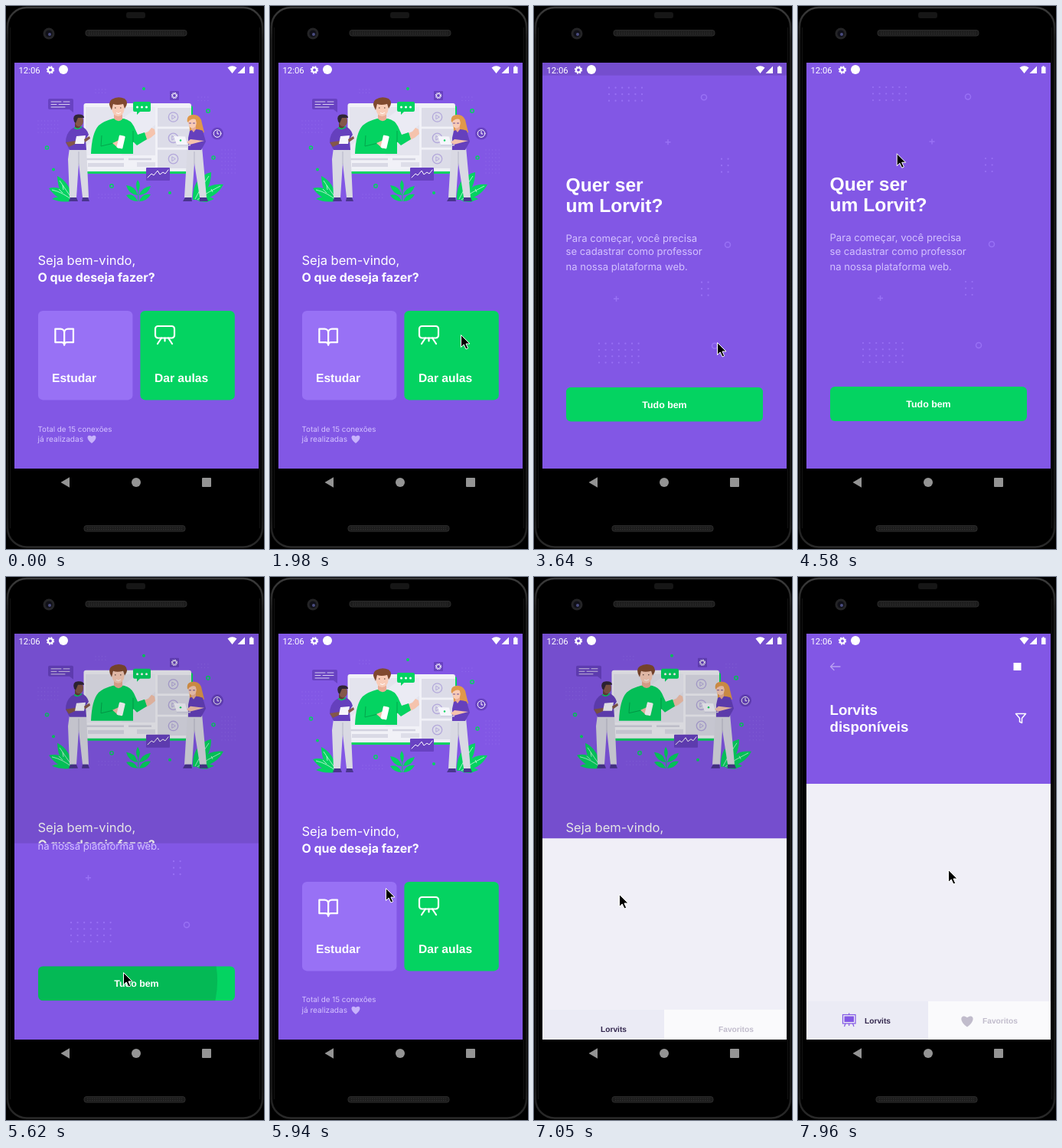
Recreate the animation shown at these times as an HTML page. Size 337 by 709 pixels, loop 7990 ms.

```html
<!DOCTYPE html>
<html lang="pt-BR">
<head>
<meta charset="utf-8">
<title>Aulas</title>
<style>
html, body { margin: 0; width: 100%; height: 100%; overflow: hidden; background: #000; }
svg { display: block; width: 337px; height: 709px; }
text { fill: #fff; text-rendering: geometricPrecision; }
.soft { font-family: Inter, "Open Sans", sans-serif; }
.bold { font-family: "Liberation Sans", Arial, sans-serif; font-weight: 700; }
.pale { fill: #d4c2ff; }
.line { fill: none; stroke: #fff; stroke-width: 2.2; stroke-linecap: round; stroke-linejoin: round; }
.dots { fill: none; stroke: #9871f5; stroke-width: 2.2; stroke-linecap: round; stroke-dasharray: 0 8.6; }
.tiny { fill: none; stroke: #9470ec; stroke-width: 1; stroke-linecap: round; stroke-dasharray: 0 4.3; }
.ring { fill: none; stroke: #9871f5; stroke-width: 1.5; }
.leaf { fill: #04d361; }
.vein { fill: none; stroke: #d5f7e3; stroke-width: .8; }
.deep { fill: #6842c2; }
.thin { fill: none; stroke: #fff; stroke-width: 1; stroke-linecap: round; stroke-linejoin: round; }
</style>
</head>
<body>
<svg viewBox="0 0 337 709">
<defs>
  <clipPath id="screen"><rect x="11" y="74" width="319" height="530"/></clipPath>
  <clipPath id="infoClip"><rect x="11" y="74" width="319" height="530"/></clipPath>
  <clipPath id="listClip"><rect x="11" y="74" width="319" height="530"/></clipPath>
  <clipPath id="studyClip"><rect x="42" y="398" width="123.400" height="116.400" rx="6.200"/></clipPath>
  <clipPath id="teachClip"><rect x="175.400" y="398" width="123.400" height="116.400" rx="6.200"/></clipPath>
  <clipPath id="okClip"><rect x="42" y="497" width="257" height="45" rx="6.200"/></clipPath>
  <linearGradient id="edge" x2="0" y2="1">
    <stop stop-color="#3c3c3c"/><stop offset=".06" stop-color="#1c1c1c"/>
    <stop offset=".94" stop-color="#181818"/><stop offset="1" stop-color="#2a2a2a"/>
  </linearGradient>
  <g id="grille">
    <rect width="132" height="7.500" rx="3" fill="#1c1c1c" stroke="#2c2c2c"/>
    <path d="M4 2.500H128M4 5H128" stroke="#333" stroke-dasharray="1.500 1.500"/>
  </g>
  <g id="play">
    <rect x="198" y="133" width="44" height="24.500" fill="#dcdce8"/>
    <circle cx="218.500" cy="145" r="6.200" fill="none" stroke="#b3a8db" stroke-width="1.300"/>
    <path d="M216.800 142.200l4.500 2.800-4.500 2.800z" fill="none" stroke="#b3a8db"/>
  </g>
  <path id="heart" d="M0 5.500C-9-1-5.500-7.500 0-3.500 5.500-7.500 9-1 0 5.500z"/>
</defs>

<g id="device">
  <rect x="2" y="2" width="333" height="704.500" rx="25" fill="#000" stroke="url(#edge)" stroke-width="2.500"/>
  <path d="M5.500 28V682M331.500 28V682" stroke="#141414"/>
  <rect x="157" y="8" width="25" height="8" rx="3" fill="#161616"/>
  <circle cx="56" cy="36" r="7.500" fill="#242426"/>
  <circle cx="56" cy="36" r="4.500" fill="#101018"/>
  <circle cx="57" cy="37" r="2" fill="#4b4d80"/>
  <use href="#grille" x="104" y="31.500"/>
  <use href="#grille" x="102" y="678.500"/>
  <g fill="#949494"><path d="M71.500 622l11.500-6.800v13.600z"/><circle cx="170" cy="622" r="6"/><rect x="256" y="616" width="12" height="12" rx="1"/></g>
</g>

<g clip-path="url(#screen)">
  <rect x="11" y="74" width="319" height="530" fill="#8257e5"/>
  <g id="home">
    <path class="tiny" d="M117 109h14m-14 4.300h14M42 150h28m-28 5h28m-28 5h28m-28 5h28M282 188h18m-18 5h18m-18 5h18m-18 5h18m-18 5h18m-18 5h18m-18 5h18M121 246h26m-26 4.500h26M251 119h14m-14 4.500h14"/>
    <g fill="none" stroke="#04d361" stroke-width="1.400">
      <circle cx="264" cy="137" r="2.300"/><circle cx="53.500" cy="185" r="2"/><circle cx="271" cy="198" r="2"/><circle cx="138" cy="235" r="2.200"/>
    </g>
    <g class="leaf"><circle cx="180" cy="108" r="2"/><circle cx="62" cy="213.500" r="2"/><circle cx="214" cy="244" r="2"/></g>

    <!-- plants -->
    <g class="leaf">
      <path d="M87 255Q68 250 67 222Q84 230 88 255z"/><path d="M86 255Q68 255 56 238Q75 233 88 255z"/><path d="M85 255Q72 257 60 252Q70 246 86 255z"/>
      <path d="M244 253Q243 224 268 217Q268 241 249 253z"/><path d="M249 254Q261 230 284 233Q274 252 249 254z"/><path d="M251 255Q262 246 272 252L262 256z"/>
      <path d="M172 241Q168 234 172 227Q177 234 173 241z"/>
      <path d="M172 247Q160 246 157 234Q169 235 172 247zM174 247Q177 237 189 235Q186 246 174 247zM172 255Q162 255 157 247Q167 244 172 255zM174 255Q178 244 189 246Q184 255 174 255z"/>
    </g>
    <path d="M172.800 238V255" stroke="#04d361"/>
    <path class="vein" d="M70 228Q78 240 88 254M60 240Q74 243 87 254M74 234l1 6M69 239l5 5M265 222Q254 237 247 252M280 235Q263 243 250 253M255 233l5 1M268 239l2 4"/>

    <!-- class screen -->
    <rect x="104" y="130" width="140" height="89" rx="3" class="leaf"/>
    <rect x="101.500" y="127" width="140.500" height="89" rx="3" fill="#f1f1f7"/>
    <rect x="104" y="132" width="91" height="63" fill="#e4e4ee"/>
    <path d="M172 132H195V155L150 195H104V183z" fill="#ebebf4"/>
    <use href="#play"/><use href="#play" y="27.300"/><use href="#play" y="54.600"/>
    <path d="M105 200H154M160 200H190" stroke="#d2d2df" stroke-width="2.500"/>
    <rect x="107" y="205" width="47" height="5" fill="#d9d9e5"/><rect x="171" y="204" width="24" height="6" fill="#dedee9"/>

    <!-- teacher -->
    <path d="M178 167L186 164 190 159 194 161 195 167 189 172 181 176z" fill="#f5c3ad"/>
    <path d="M111 193Q112 166 121 156Q128 150 140 147H154Q163 149 167 157L172 168 181 165 184 174 171 182 166 177V193z" fill="#04d361"/>
    <path d="M125 169L124 183 141 179M166 163V178" fill="none" stroke="#03a54c"/>
    <path d="M141 140H152V148Q146 153 141 147z" fill="#eaac95"/>
    <ellipse cx="146.500" cy="134.500" rx="8" ry="9.500" fill="#f8cbb7"/>
    <path d="M138 136Q132 126 138 122Q146 117 155 121Q161 126 155 134L153 128Q145 130 140 128z" fill="#80492f"/>
    <path d="M144 139.500Q147 142 150 139" fill="none" stroke="#fff"/>
    <path d="M142 133h1.500M149 133h1.500" stroke="#44302c"/>
    <path d="M139 179L148 175 153 180 147 186z" fill="#f5c3ad"/>
    <rect x="146" y="169" width="8" height="17" rx="1.500" fill="#fff" transform="rotate(13 150 178)"/>

    <!-- bubbles and tiles -->
    <path d="M168 125H187Q189 125 189 127V136Q189 138 187 138H175L171 142V138H168Q166 138 166 136V127Q166 125 168 125z" class="leaf"/>
    <g fill="#fff"><circle cx="171.500" cy="132" r="1.500"/><circle cx="177.500" cy="132" r="1.500"/><circle cx="183.500" cy="132" r="1.500"/></g>
    <path class="deep" d="M57 121H86Q88 121 88 123V139L83 135H57Q55 135 55 133V123Q55 121 57 121z"/>
    <path class="thin" d="M59 125H72M75 125H83M59 128.500H66M69 128.500H83M59 132H77" opacity=".75"/>
    <rect class="deep" x="214" y="111" width="12" height="12" rx="1"/>
    <circle cx="220" cy="117" r="2.500" class="thin"/><circle cx="220" cy="117" r="3.700" class="thin" stroke-dasharray="1.200 1.700"/>
    <circle class="deep" cx="276" cy="166.500" r="8"/>
    <circle class="thin" cx="276" cy="166.500" r="4.800"/><path class="thin" d="M276 163.500V167H278"/>
    <rect class="deep" x="183" y="211" width="31" height="17" rx="1"/>
    <path class="thin" d="M185 224L190 219 193 221 198 215 201 220 205 217 208 219 212 214"/>

    <!-- student with tablet -->
    <path d="M83 185H105L108 250H100L95 205 92 250H83L81 200z" fill="#d9d9e3"/><path d="M95 190V207" stroke="#b5b5c7"/>
    <path d="M84 250h8l2 5H82zM100 250h7l2 5H99z" fill="#49358e"/>
    <path d="M85 161Q90 157 98 157Q106 160 108 168L104 174 105 188H83L78 178Q78 167 85 161z" fill="#6540bd"/>
    <path d="M90 152H97V158L94 161 90 158z" fill="#643f36"/>
    <ellipse cx="95.500" cy="150" rx="5.500" ry="7.500" fill="#84574a"/>
    <path d="M89 151Q86 142 94 141.500Q102 141 102 146L94 146 91 153z" fill="#302536"/>
    <path d="M89 158.500Q94 163 99 157.500" fill="none" stroke="#04d361" stroke-width="1.400"/>
    <path d="M78 178L91 176 93 179 82 184z" fill="#84574a"/>
    <path d="M92 170l12-1-2 11-12 0z" fill="#f5f5fb"/><path d="M102 174l7-4 1 3-7 5z" fill="#84574a"/>

    <!-- student with laptop -->
    <path d="M237 184H256L262 250H253L246 205 243 250H233z" fill="#d9d9e3"/><path d="M246 190V207" stroke="#b5b5c7"/>
    <path d="M234 250h8l1 5H231zM253 250h9l2 5H253z" fill="#49358e"/>
    <path d="M237 149Q238 142 246 142Q255 143 256 153L259 165 249 167 240 164Q240 154 237 149z" fill="#e0984b"/>
    <path d="M240 163Q249 159 257 163L261 177 255 188H238V172z" fill="#6540bd"/>
    <path d="M242 155H248V161L245 165 242 161z" fill="#eaac95"/>
    <ellipse cx="243.500" cy="152.500" rx="5.200" ry="7" fill="#f8cbb7"/>
    <path d="M237 152Q235 142 245 142Q254 143 254 155L251 161 248 148Q242 146 237 152z" fill="#e0984b"/>
    <path d="M239 153h3M244 153h3" stroke="#70508f"/>
    <path d="M259 176L240 181 236 178 241 174z" fill="#f5c3ad"/>
    <path d="M219 170L234 170.500 237 181 223 181z" fill="#f5f5fb"/><path d="M223 181H241V182.500H223z" fill="#cfcfe0"/>
    <circle cx="228" cy="175.500" r="1.200" class="leaf"/>

    <text class="soft" x="41.500" y="338" font-size="16.500">Seja bem-vindo,</text>
    <text class="soft" x="41.500" y="360" font-size="15.900" font-weight="700">O que deseja fazer?</text>
    <g clip-path="url(#studyClip)">
      <rect x="42" y="398" width="124" height="117" fill="#9871f5"/>
      <circle id="studyRipple" cx="111" cy="414"/>
    </g>
    <path class="line" transform="translate(62 418) scale(1.180)" style="stroke-width:1.900" d="M2 3h6a4 4 0 0 1 4 4v14a3 3 0 0 0-3-3H2zM22 3h-6a4 4 0 0 0-4 4v14a3 3 0 0 1 3-3h7z"/>
    <text class="bold" x="60" y="491" font-size="15.600">Estudar</text>
    <g clip-path="url(#teachClip)">
      <rect x="175" y="398" width="124" height="117" fill="#04d361"/>
      <circle id="teachRipple" cx="239" cy="439"/>
    </g>
    <rect class="line" x="195" y="418" width="25" height="15.500" rx="3.500"/>
    <path class="line" d="M203 433.500L198 441M212 433.500L217 441M207.500 433.500V437.500"/>
    <text class="bold" x="194" y="491" font-size="15.600">Dar aulas</text>
    <text class="soft pale" x="41.500" y="555.500" font-size="9.800">Total de 15 conexões</text>
    <text class="soft pale" x="41.500" y="569" font-size="10.100">já realizadas</text>
    <use href="#heart" x="112" y="565.500" fill="#d4c2ff" opacity=".85"/>
  </g>
  <rect id="shade" x="11" y="74" width="319" height="530" opacity="0"/>

  <g clip-path="url(#infoClip)"><g id="info">
    <rect x="11" y="52" width="319" height="575" fill="#8257e5"/>
    <path class="dots" d="M98 106h43.500m-43.500 8.500h43.500m-43.500 8.500h43.500M245 199h9m-9 8.500h9m-9 8.500h9M219 360h9m-9 8.500h9m-9 8.500h9M85 440h52m-52 8.300h52m-52 8.300h52m-52 8.300h52"/>
    <g class="ring"><circle cx="222" cy="118.500" r="3.500"/><circle cx="253" cy="311" r="3.500"/><circle cx="236" cy="443" r="3.500"/><path d="M171.500 177h7m-3.500-3.500v7M104 381.500h7m-3.500-3.500v7"/></g>
    <text class="bold" x="41.500" y="241" font-size="24.600">Quer ser</text>
    <text class="bold" x="41.500" y="268" font-size="24.600">um Lorvit?</text>
    <g class="soft" font-size="13.100">
      <text class="pale" x="41.500" y="307">Para começar, você precisa</text>
      <text class="pale" x="41.500" y="324.500">se cadastrar como professor</text>
      <text class="pale" x="41.500" y="344.500">na nossa plataforma web.</text>
    </g>
    <g clip-path="url(#okClip)">
      <rect x="42" y="497" width="257" height="45" fill="#04d361"/>
      <circle id="okRipple" cx="153" cy="516"/>
    </g>
    <text class="bold" x="170.500" y="524" font-size="12.400" text-anchor="middle">Tudo bem</text>
  </g></g>

  <g clip-path="url(#listClip)"><g id="list">
    <rect x="11" y="52" width="319" height="575" fill="#f0eff7"/>
    <rect x="11" y="52" width="319" height="218" fill="#8257e5"/>
    <path class="line" style="stroke:#b9a0f2;stroke-width:1.300" d="M55 117H42.500M47 112.500L42.500 117 47 121.500"/>
    <rect x="281.500" y="112" width="10" height="10" fill="#fff"/>
    <text class="bold" x="41.500" y="180" font-size="18.700">Lorvits</text>
    <text class="bold" x="41.500" y="202" font-size="18.700">disponíveis</text>
    <path class="line" style="stroke-width:1.500" d="M284.500 178.500H297.500L292.500 184.500V190.500L289.500 189V184.500z"/>
    <rect x="11" y="554" width="159" height="50" fill="#ebebf5"/>
    <rect x="170" y="554" width="160" height="50" fill="#fafafc"/>
    <g id="icons">
      <g fill="none" stroke="#8257e5" stroke-width="1.200"><rect x="58.500" y="571.500" width="16.500" height="11.500"/><path d="M66.700 569.500V571.500M62 583L60.500 587M71.500 583L73 587M66.700 583V586"/></g>
      <rect x="60.500" y="573.500" width="12.500" height="7.500" fill="#8257e5"/>
      <use href="#heart" transform="translate(221 580) scale(1.380)" fill="#c1bccc"/>
    </g>
    <text class="bold" x="87" y="583" font-size="10.200" style="fill:#32264d">Lorvits</text>
    <text class="bold" x="241" y="583" font-size="10.200" style="fill:#c1bccc">Favoritos</text>
  </g></g>

  <!-- status bar -->
  <text x="16.500" y="87.500" font-size="11.300" font-family="Roboto, sans-serif">12:06</text>
  <circle cx="58" cy="83.500" r="3" fill="none" stroke="#fff" stroke-width="2.200"/>
  <circle cx="58" cy="83.500" r="4.500" fill="none" stroke="#fff" stroke-width="1.400" stroke-dasharray="1.900 1.630"/>
  <circle cx="75" cy="83" r="6" fill="#fff"/>
  <path d="M289.500 80.500Q295.500 76 301.500 80.500L295.500 88zM312 78.500V88H302.500zM318 79.500H319.500V78.300H321.500V79.500H323.500V88H318z" fill="#fff"/>
</g>

<path id="cursor" d="M.5 .5V16.500L4.200 13 7 19 9.700 17.800 7 12H12z" fill="#000" stroke="#fff" stroke-width="1"/>
</svg>

<script>
const LOOP = 7990, SLIDE = 425, TOP = 74, HEIGHT = 530;
const $ = id => document.getElementById(id);
const clamp = v => Math.min(1, Math.max(0, v));

// time, x, y of the pointer tip
const path = [
  [410, 298, 700], [560, 298, 530], [740, 297, 381], [830, 275, 398], [920, 252, 425],
  [1100, 252, 425], [1250, 250, 427], [1950, 250, 427], [1980, 249, 429], [2190, 244, 432],
  [2520, 244, 432], [2610, 239, 439], [3880, 239, 439],
  [3970, 207, 488], [4090, 90, 420], [4180, 28, 335], [4290, 150, 345],
  [4400, 281, 290], [4490, 215, 175], [4580, 129, 192], [4690, 93, 221],
  [4720, 93, 223], [4900, 105, 330], [5070, 142, 470], [5220, 153, 516],
  [5640, 153, 516], [5940, 151, 406], [6210, 133, 416], [6440, 111, 414],
  [7470, 111, 414], [7560, 122, 380], [7690, 152, 318], [7830, 198, 362], [7960, 196, 382]
];

const ripples = [['teachRipple', 3100, 150], ['okRipple', 5440, 170], ['studyRipple', 6690, 130]];

function bezier(x1, y1, x2, y2) {
  const at = (a, b, s) => 3 * (1 - s) ** 2 * s * a + 3 * (1 - s) * s * s * b + s ** 3;
  return x => {
    if (x <= 0 || x >= 1) return clamp(x);
    let lo = 0, hi = 1;
    for (let i = 0; i < 24; i++) {
      const mid = (lo + hi) / 2;
      if (at(x1, x2, mid) < x) lo = mid; else hi = mid;
    }
    return at(y1, y2, lo);
  };
}
const ease = bezier(.20833, .82, .25, 1);
const slide = (t, start) => ease(clamp((t - start) / SLIDE));

function pointer(t) {
  const i = path.findIndex(k => k[0] > t);
  if (i < 0) return path[path.length - 1].slice(1);
  const [ta, xa, ya] = path[i - 1], [tb, xb, yb] = path[i];
  const k = (t - ta) / (tb - ta);
  return [xa + (xb - xa) * k, ya + (yb - ya) * k];
}

// The window rises from the bottom while its content drifts only slightly.
function reveal(id, p) {
  const hidden = HEIGHT * (1 - p);
  $(id + 'Clip').firstElementChild.setAttribute('y', TOP + hidden);
  $(id).setAttribute('transform', `translate(0 ${hidden * .041})`);
  $(id).style.visibility = p > 0 ? 'visible' : 'hidden';
}

function draw(t) {
  const info = t < 5560 ? slide(t, 3388) : 1 - slide(t, 5560);
  const list = slide(t, 6993);
  const p = Math.max(info, list);
  reveal('info', info);
  reveal('list', list);
  $('home').setAttribute('transform', `translate(0 ${-HEIGHT * .02 * p})`);
  $('shade').setAttribute('opacity', .1 * clamp(p / .36));
  $('icons').style.visibility = t >= 7200 ? 'visible' : 'hidden';

  for (const [id, start, size] of ripples) {
    const age = t - start;
    $(id).setAttribute('r', size * clamp(age / 250));
    $(id).setAttribute('opacity', age < 0 ? 0 : .12 * clamp(age / 75) * (1 - clamp((age - 330) / 200)));
  }

  const shown = t >= path[0][0];
  $('cursor').style.visibility = shown ? 'visible' : 'hidden';
  if (shown) $('cursor').setAttribute('transform', `translate(${pointer(t)})`);
}

const begin = performance.now();
function tick() {
  draw((performance.now() - begin) % LOOP);
  requestAnimationFrame(tick);
}
tick();
</script>
</body>
</html>
```
